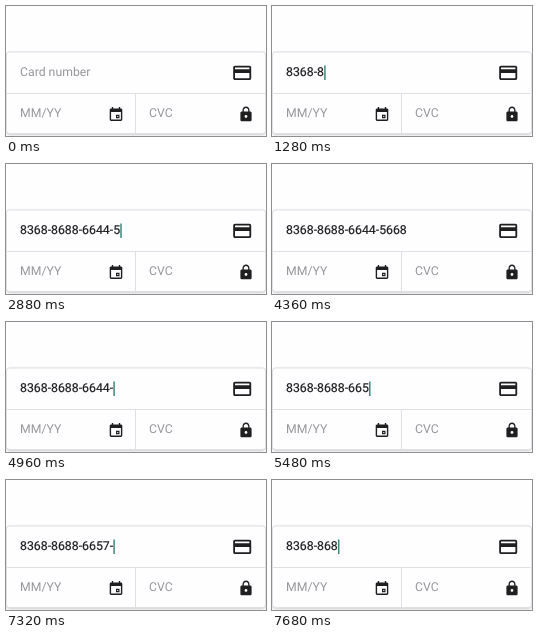
Recreate the animation shown at these times as an HTML page. Size 260 px wide and 130 px high, loop 8000 ms.

```html
<!DOCTYPE html>
<html lang="en">
<head>
<meta charset="utf-8">
<title>Card form</title>
<style>
  html, body { margin: 0; width: 100%; height: 100%; overflow: hidden; background: #fefdff; }
  svg { display: block; width: 260px; height: 130px; }
  text { font: 12.25px Roboto, sans-serif; fill: #979797; text-rendering: geometricPrecision; }
  #number { font-size: 12.3px; fill: #1c1c1c; stroke: #1c1c1c; stroke-width: .2px; }
  #panel { fill: #fefdff; stroke: #e0dfe2; filter: drop-shadow(0 1px 1px #0003); }
  .icon { fill: #1f1f1f; }
</style>
</head>
<body>
<svg viewBox="0 0 260 130">
  <rect id="panel" x=".5" y="46" width="259" height="81.5" rx="3"/>
  <path d="M1 87.5H259M129.5 88V127" stroke="#e0dfe2"/>
  <text id="hint" x="14" y="70.3">Card number</text>
  <text id="number" x="14" y="70.3"></text>
  <rect id="caret" y="59.5" width="1.5" height="14.5" fill="#3a8a7b"/>
  <text x="14" y="111.3">MM/YY</text>
  <text x="143" y="111.3">CVC</text>
  <path class="icon" transform="translate(225.4 56.1) scale(.9)" d="M20 4H4c-1.11 0-2 .89-2 2v12c0 1.11.89 2 2 2h16c1.11 0 2-.89 2-2V6c0-1.11-.89-2-2-2zm0 14H4v-6h16v6zm0-10H4V6h16v2z"/>
  <path class="icon" transform="translate(101.6 100.3) scale(.7)" d="M17 12h-5v5h5v-5zM15.3 13.7v1.6h-1.6v-1.6zM16 1v2H8V1H6v2H5c-1.11 0-1.99.9-1.99 2L3 19c0 1.1.89 2 2 2h14c1.1 0 2-.9 2-2V5c0-1.1-.9-2-2-2h-1V1h-2zm3 18H5V8h14v11z"/>
  <path class="icon" transform="translate(231.6 99.9) scale(.7)" d="M18 8h-1V6c0-2.76-2.24-5-5-5S7 3.24 7 6v2H6c-1.1 0-2 .9-2 2v10c0 1.1.9 2 2 2h12c1.1 0 2-.9 2-2V10c0-1.1-.9-2-2-2zm-6 9c-1.1 0-2-.9-2-2s.9-2 2-2 2 .9 2 2-.9 2-2 2zm3.1-9H8.9V6c0-1.71 1.39-3.1 3.1-3.1 1.71 0 3.1 1.39 3.1 3.1v2z"/>
</svg>
<script>
const LOOP = 8000, TICK = 40, REPEAT = 50;
const [hint, number, caret] = ['hint', 'number', 'caret'].map(id => document.getElementById(id));
const states = [{ at: 0, value: '', caret: false }];
const value = () => states[states.length - 1].value;
const add = (at, value, caret = true) => states.push({ at, value, caret });

// A hyphen appears together with the first digit of the next group.
const group = digits => digits.replace(/\d{4}(?=\d)/g, '$&-');
const type = (digits, times) => [...digits].forEach((digit, i) =>
  add(times[i], group(value().replace(/-/g, '') + digit)));

// A held backspace removes one character per repeat, hyphens included.
const erase = (start, count) => {
  for (let i = 0; i < count; i++)
    add(Math.ceil((start + i * REPEAT) / TICK) * TICK, value().slice(0, -1));
};
const hideCaret = at => add(at, value(), false);

type('8368868866445668', [360, 640, 880, 1000, 1280, 1480, 1680, 1880,
  2040, 2240, 2520, 2720, 2880, 3040, 3200, 3360]);
hideCaret(4360);
erase(4800, 7);
type('575668', [5480, 5600, 5880, 5960, 5960, 6040]);
hideCaret(6880);
erase(7160, 11);

let shown;
function draw(now) {
  const time = now % LOOP;
  const state = states.findLast(s => s.at <= time);
  if (state !== shown) {
    shown = state;
    number.textContent = state.value;
    hint.style.display = state.value ? 'none' : '';
    caret.style.display = state.caret ? '' : 'none';
    caret.setAttribute('x', 14.2 + number.getComputedTextLength());
  }
  requestAnimationFrame(draw);
}
draw(0);
</script>
</body>
</html>
```
